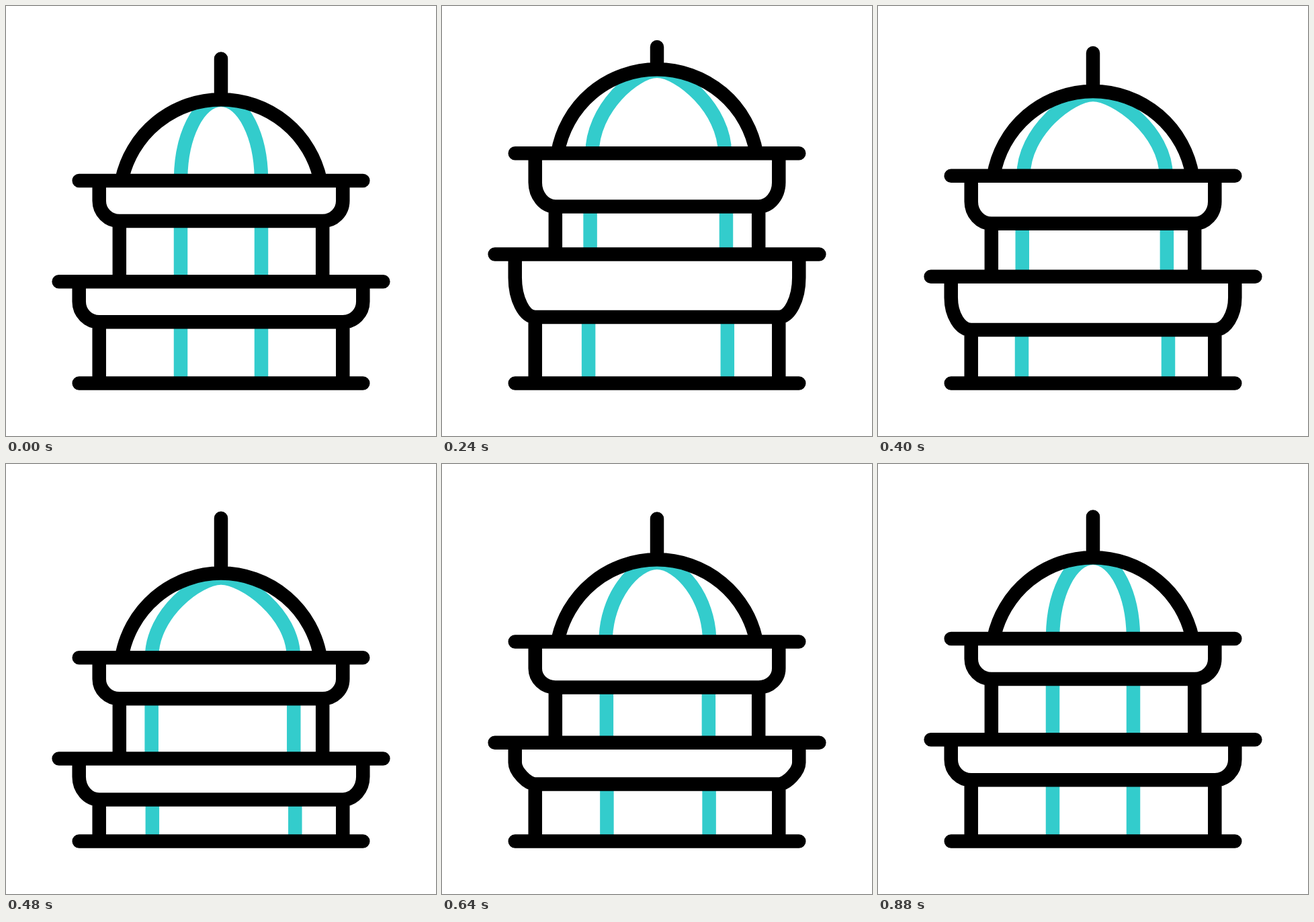
An HTML page for the animation above (1480 ms loop, 640x640 px).

```html
<!DOCTYPE html>
<html lang="en">
<head>
<meta charset="utf-8">
<title>Bouncing domed building</title>
<style>
  html, body { margin: 0; height: 100%; overflow: hidden; background: #fff; }
  svg { display: block; width: 100%; height: 100%; }
  path { fill: none; stroke-width: 20.5; }
  #accent { stroke: #33cccc; }
  #frame { stroke: #000; stroke-linecap: round; }
</style>
</head>
<body>
<svg viewBox="0 0 640 640"><path id="accent"/><path id="frame"/></svg>
<script>
const LOOP = 1480, STEP = 40, GROUND = 561.5;
const times = [160, 280, 520, 720, 880];

// Each part: rest, stretched, squashed, rebound (then rest again)
const poses = {
  spire:    [78.6, 57.3, 82.6, 80.8],
  dome:     [139.3, 85, 168.8, 128],
  upper:    [259.9, 211, 294.5, 248.2],
  upperRim: [290, 257, 325, 293],
  upperLow: [320, 294, 353.7, 320.8],
  lower:    [410.3, 361, 444.7, 398.6],
  lowerRim: [440, 397, 471, 430],
  lowerLow: [470.3, 461.5, 502.5, 462.3],
  bend:     [16.6, 16.6, 16.6, 9],
  apex:     [139.7, 88, 176, 131],
  archL:    [260, 216, 217, 258],
  archR:    [380, 429.4, 428, 382],
  midL:     [260, 212.5, 217, 260],
  midR:     [380, 431.8, 428, 380],
  lowL:     [260, 209.5, 218.5, 260],
  lowR:     [380, 434, 430, 380]
};

function poseAt(ms) {
  const t = Math.min(Math.max(ms, times[0]), times[4]);
  const i = Math.min(3, times.filter(k => k <= t).length - 1);
  let u = (t - times[i]) / (times[i + 1] - times[i]);
  if (i === 0) u **= 0.75; // quicker launch
  const s = u * u * (3 - 2 * u);
  const p = {};
  for (const name in poses) {
    const v = poses[name];
    p[name] = v[i] + (v[(i + 1) % 4] - v[i]) * s;
  }
  return p;
}

const line = (x1, y1, x2, y2) => `M${x1} ${y1}L${x2} ${y2}`;
const beam = (x, y) => line(x, y, 640 - x, y);
const posts = (l, r, y1, y2) => line(l, y1, l, y2) + line(r, y1, r, y2);

// Open tray hanging from a beam, with rounded lower corners
function tray(x, top, rim, low, k) {
  const r = 640 - x, v = rim + k + (low - rim - 30) / 2;
  return `M${x} ${top}V${rim}C${x} ${v} ${x + 30 - k} ${low} ${x + 30} ${low}` +
    `H${r - 30}C${r - 30 + k} ${low} ${r} ${v} ${r} ${rim}V${top}`;
}

function dome(y, top) {
  const half = 148, sag = y - top, r = (half * half + sag * sag) / (2 * sag);
  return `M172 ${y}A${r} ${r} 0 0 1 468 ${y}`;
}

function arch(l, r, y, top) {
  const h = y - 66.7;
  return `M${l} ${y}C${l} ${h} 287 ${top} 320 ${top}S${r} ${h} ${r} ${y}`;
}

const accent = document.getElementById("accent");
const frame = document.getElementById("frame");

function draw(now) {
  const ms = Math.floor((now % LOOP) / STEP) * STEP;
  const p = poseAt(ms);
  accent.setAttribute("d",
    arch(p.archL, p.archR, p.upper, p.apex) +
    posts(p.midL, p.midR, p.upperLow, p.lower) +
    posts(p.lowL, p.lowR, p.lowerLow, GROUND));
  frame.setAttribute("d",
    line(320, p.spire, 320, p.dome) +
    dome(p.upper, p.dome) +
    beam(108.7, p.upper) +
    tray(138.7, p.upper, p.upperRim, p.upperLow, 16.6) +
    posts(168.8, 471.2, p.upperLow, p.lower) +
    beam(78.6, p.lower) +
    tray(108.7, p.lower, p.lowerRim, p.lowerLow, p.bend) +
    posts(138.7, 501.3, p.lowerLow, GROUND) +
    beam(108.7, GROUND));
}

const start = performance.now();
function tick() {
  draw(performance.now() - start);
  requestAnimationFrame(tick);
}
tick();
</script>
</body>
</html>
```
